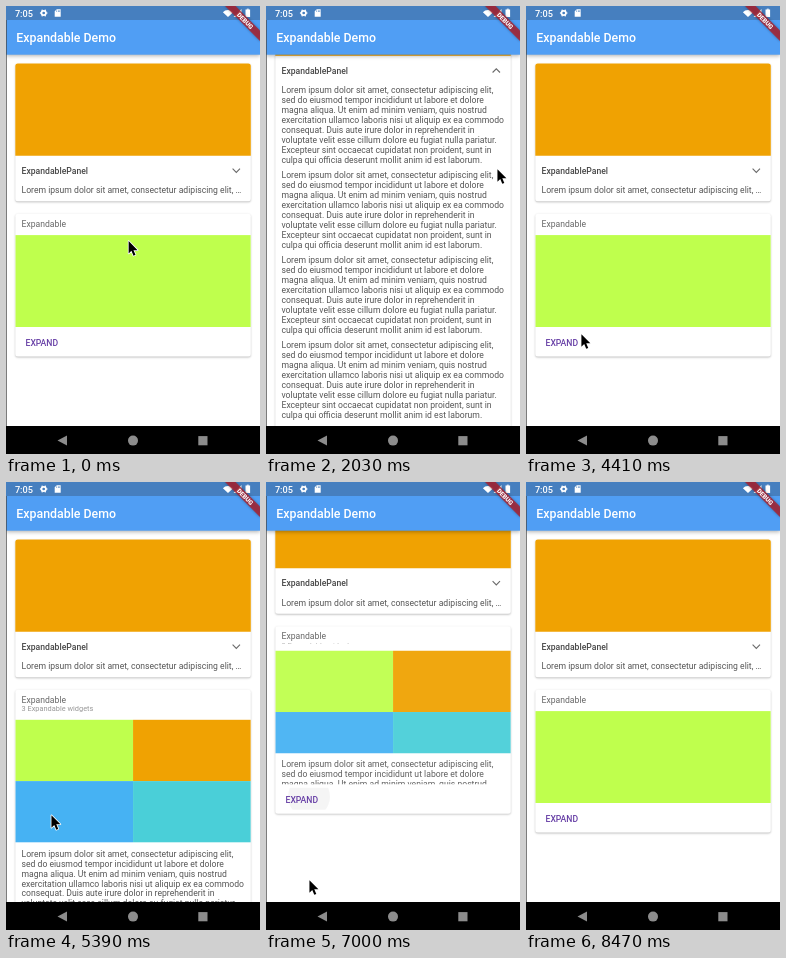
An HTML page with a canvas that plays this animation: 254x448 px, repeating every 8540 ms.

```html
<!DOCTYPE html>
<html lang="en">
<head>
<meta charset="utf-8">
<title>Expandable Demo</title>
<style>
html, body { margin: 0; width: 100%; height: 100%; overflow: hidden; background: #fff; }
canvas { display: block; width: 254px; height: 448px; }
</style>
</head>
<body>
<canvas id="stage"></canvas>
<script>
const W = 254, H = 448, LOOP = 8540;
const LEFT = 9.3, RIGHT = 244.8, WIDE = RIGHT - LEFT, HALF = WIDE / 2;
const TEXT_X = 15.5;
const ORANGE = '#f0a202', LIME = '#bfff4d', BLUE = '#46b2f3', TEAL = '#4acfd8';
const INK = '#565656', DARK = '#484848', PURPLE = '#673fa6';
const LOREM = [
  'Lorem ipsum dolor sit amet, consectetur adipiscing elit,',
  'sed do eiusmod tempor incididunt ut labore et dolore',
  'magna aliqua. Ut enim ad minim veniam, quis nostrud',
  'exercitation ullamco laboris nisi ut aliquip ex ea commodo',
  'consequat. Duis aute irure dolor in reprehenderit in',
  'voluptate velit esse cillum dolore eu fugiat nulla pariatur.',
  'Excepteur sint occaecat cupidatat non proident, sunt in',
  'culpa qui officia deserunt mollit anim id est laborum.'
];
// Pointer keys: time, x, y
const POINTER = [
  [0, 122, 234], [540, 231, 162], [2150, 231, 162], [2800, 232, 60],
  [3880, 232, 60], [4410, 55, 327], [4620, 45, 332], [5740, 45, 332],
  [6090, 45, 364], [6420, 43, 397], [8150, 43, 397], [8450, 95, 450], [LOOP, 95, 450]
];

const canvas = document.getElementById('stage');
const ctx = canvas.getContext('2d');
const ratio = window.devicePixelRatio || 1;
canvas.width = W * ratio;
canvas.height = H * ratio;

const clamp = x => Math.min(1, Math.max(0, x));
const mix = (a, b, k) => a + (b - a) * k;
const span = (t, start, length) => clamp((t - start) / length);
const smooth = k => k * k * (3 - 2 * k);

// cubic-bezier(.4, 0, .2, 1)
function fastOutSlowIn(x) {
  let lo = 0, hi = 1, s = 0.5;
  for (let i = 0; i < 20; i++) {
    s = (lo + hi) / 2;
    const bx = 1.2 * s * (1 - s) ** 2 + 0.6 * s * s * (1 - s) + s ** 3;
    if (bx < x) lo = s; else hi = s;
  }
  return s * s * (3 - 2 * s);
}

// Overdamped spring, from 1 at rest to 0
function spring(ms) {
  const s = Math.max(0, ms) / 1000;
  return 1.7 * Math.exp(-9.1 * s) - 0.7 * Math.exp(-22 * s);
}

function toggle(t, open, close) {
  const up = span(t, open, 500), down = span(t, close, 500);
  const linear = up - down;
  return {
    size: fastOutSlowIn(up) - fastOutSlowIn(down),
    turn: linear,
    closedAlpha: 1 - clamp(linear / 0.45),
    openAlpha: clamp((linear - 0.2) / 0.4)
  };
}

function scrollAt(t) {
  const first = 100 * smooth(span(t, 1740, 290)) * spring(t - 3420);
  const second = 63.5 * smooth(span(t, 5450, 270)) * spring(t - 7005);
  return t < 5000 ? first : second;
}

function pointerAt(t) {
  const i = POINTER.findIndex(key => key[0] > t);
  const [t0, x0, y0] = POINTER[i - 1], [t1, x1, y1] = POINTER[i];
  const k = (t - t0) / (t1 - t0);
  return [mix(x0, x1, k), mix(y0, y1, k)];
}

function rect(x, y, w, h, color) {
  ctx.fillStyle = color;
  ctx.fillRect(x, y, w, h);
}

function poly(points, color) {
  ctx.beginPath();
  points.forEach(([x, y]) => ctx.lineTo(x, y));
  ctx.closePath();
  ctx.fillStyle = color;
  ctx.fill();
}

function disc(x, y, r, color) {
  ctx.beginPath();
  ctx.arc(x, y, r, 0, 2 * Math.PI);
  ctx.fillStyle = color;
  ctx.fill();
}

function text(string, x, y, { size = 8.65, weight = 400, color = INK } = {}) {
  ctx.font = `${weight} ${size}px Roboto, sans-serif`;
  ctx.fillStyle = color;
  ctx.fillText(string, x, y);
}

function saved(draw) {
  ctx.save();
  draw();
  ctx.restore();
}

function clipped(x, y, w, h, alpha, draw) {
  if (alpha <= 0 || h <= 0) return;
  saved(() => {
    ctx.beginPath();
    ctx.rect(x, y, w, h);
    ctx.clip();
    ctx.globalAlpha = alpha;
    draw();
  });
}

function card(top, bottom) {
  saved(() => {
    ctx.shadowColor = 'rgba(0,0,0,.25)';
    ctx.shadowBlur = 2 * ratio;
    ctx.shadowOffsetY = 0.9 * ratio;
    ctx.beginPath();
    ctx.roundRect(LEFT, top, WIDE, bottom - top, 2.5);
    ctx.fillStyle = '#fff';
    ctx.fill();
  });
}

function paragraph(y) {
  LOREM.forEach((line, i) => text(line, TEXT_X, y + i * 9.9));
}

function ripple(t, start, x, y, x0, y0, w, h) {
  const age = t - start;
  if (age < 0 || age > 500) return;
  const alpha = 0.055 * (1 - span(age, 220, 280));
  clipped(x0, y0, w, h, 1, () => disc(x, y, 6 + 15 * span(age, 0, 300), `rgba(0,0,0,${alpha})`));
}

function panelCard(t, state) {
  const grow = 414 * state.size;
  card(57.3, 195.3 + grow);
  saved(() => {
    ctx.beginPath();
    ctx.roundRect(LEFT, 57.4, WIDE, 92.3, [2.5, 2.5, 0, 0]);
    ctx.fillStyle = ORANGE;
    ctx.fill();
  });
  [1120, 3080].forEach(start => ripple(t, start, 231.5, 165, LEFT, 150, WIDE, 36));
  text('ExpandablePanel', TEXT_X, 167.8, { weight: 500, color: DARK });
  saved(() => {
    ctx.translate(230.3, 164.6);
    ctx.rotate(Math.PI * state.turn);
    ctx.beginPath();
    ctx.moveTo(-3.7, -1.9);
    ctx.lineTo(0, 1.8);
    ctx.lineTo(3.7, -1.9);
    ctx.strokeStyle = '#6a6a6a';
    ctx.lineWidth = 1.1;
    ctx.stroke();
  });
  const height = 11 + grow;
  clipped(LEFT, 178.5, WIDE, height, state.closedAlpha, () => text(LOREM[0] + ' …', TEXT_X, 187.4));
  clipped(LEFT, 178.5, WIDE, height, state.openAlpha, () => {
    for (let i = 0; i < 5; i++) paragraph(187.4 + i * 85);
  });
}

function galleryCard(t, state, top) {
  const p = state.size;
  saved(() => {
    ctx.translate(0, top);
    const imageTop = 21.4 + 8.5 * p, imageHeight = mix(92, 123, p);
    const bodyTop = imageTop + imageHeight, bodyHeight = 90 * p;
    const bottom = bodyTop + bodyHeight + 29.5;
    card(0, bottom);
    text('Expandable', TEXT_X, 13.2, { color: '#686868' });
    clipped(LEFT, 14, WIDE, 10 * p, state.openAlpha, () =>
      text('3 Expandable widgets', TEXT_X, 21.4, { size: 7.4, color: '#989898' }));
    clipped(LEFT, imageTop, WIDE, imageHeight, state.closedAlpha, () =>
      rect(LEFT, imageTop, WIDE, 92, LIME));
    clipped(LEFT, imageTop, WIDE, imageHeight, state.openAlpha, () => {
      rect(LEFT, imageTop, HALF, 61.5, LIME);
      rect(LEFT + HALF, imageTop, HALF, 61.5, ORANGE);
      rect(LEFT, imageTop + 61.5, HALF, 61.5, BLUE);
      rect(LEFT + HALF, imageTop + 61.5, HALF, 61.5, TEAL);
    });
    clipped(LEFT, bodyTop, WIDE, bodyHeight, state.openAlpha, () => paragraph(bodyTop + 14.2));
    ripple(t, 4740, 45, bottom - 17, 14, bottom - 26, 45, 22);
    ripple(t, 6700, 43, bottom - 17, 14, bottom - 26, 53, 22);
    text(p > 0.5 ? 'COLLAPSE' : 'EXPAND', 19.5, bottom - 11, { weight: 500, color: PURPLE });
  });
}

function statusIcons() {
  // Gear
  ctx.strokeStyle = '#fff';
  ctx.lineWidth = 1.7;
  ctx.beginPath();
  ctx.arc(37.7, 7, 2.2, 0, 2 * Math.PI);
  ctx.stroke();
  for (let i = 0; i < 6; i++) {
    const a = i * Math.PI / 3;
    disc(37.7 + 3.1 * Math.cos(a), 7 + 3.1 * Math.sin(a), 0.8, '#fff');
  }
  // Memory card
  poly([[50.8, 3.2], [54.7, 3.2], [54.7, 10.8], [48.7, 10.8], [48.7, 5.3]], '#fff');
  [50.5, 52, 53.5].forEach(x => rect(x, 4.3, 0.6, 1.7, '#467fbf'));
  // Wi-Fi, signal, battery
  ctx.beginPath();
  ctx.moveTo(222, 11);
  ctx.arc(222, 11, 7, -Math.PI * 0.76, -Math.PI * 0.24);
  ctx.fillStyle = '#fff';
  ctx.fill();
  poly([[235.5, 3], [235.5, 11], [227.5, 11]], '#fff');
  rect(239.5, 3.5, 4.6, 7.5, '#fff');
  rect(240.8, 2.7, 2, 1, '#fff');
}

function chrome() {
  saved(() => {
    ctx.shadowColor = 'rgba(0,0,0,.3)';
    ctx.shadowBlur = 4 * ratio;
    ctx.shadowOffsetY = 1 * ratio;
    rect(0, 0, W, 48.7, '#509ef4');
  });
  rect(0, 0, W, 14, '#467fbf');
  text('7:05', 8.9, 10.8, { size: 9.2, weight: 500, color: '#fff' });
  statusIcons();
  text('Expandable Demo', 10.3, 36.4, { size: 12.36, weight: 500, color: '#fff' });

  saved(() => {
    ctx.translate(W, 0);
    ctx.rotate(Math.PI / 4);
    saved(() => {
      ctx.shadowColor = 'rgba(0,0,0,.4)';
      ctx.shadowBlur = 3 * ratio;
      rect(-24.7, 17.3, 49.4, 7.4, 'rgba(172,32,46,.82)');
    });
    ctx.textAlign = 'center';
    text('DEBUG', 0, 23.3, { size: 6.3, weight: 900, color: '#fff' });
  });

  rect(0, 420, W, 28, '#000');
  poly([[51.5, 434.6], [61, 429.6], [61, 439.6]], '#8c8c8c');
  disc(127, 434.6, 5, '#8c8c8c');
  rect(192.3, 430.1, 9.2, 9.2, '#8c8c8c');
  rect(0, 14, 0.7, 406, '#444');
}

function pointer(x, y) {
  saved(() => {
    ctx.translate(x, y + 0.8);
    ctx.scale(0.88, 0.88);
    ctx.lineJoin = 'round';
    ctx.strokeStyle = '#fff';
    ctx.lineWidth = 1.8;
    poly([[0.5, 0.5], [0.5, 14.6], [3.7, 11.6], [6, 17], [8.3, 16], [6, 10.8], [10.7, 10.8]], '#000');
    ctx.stroke();
    ctx.fill();
  });
}

function draw(t) {
  const panel = toggle(t, 1190, 3186);
  const gallery = toggle(t, 4830, 6790);
  ctx.setTransform(ratio, 0, 0, ratio, 0, 0);
  rect(0, 0, W, H, '#fff');
  saved(() => {
    ctx.translate(0, -scrollAt(t));
    panelCard(t, panel);
    galleryCard(t, gallery, 207.7 + 414 * panel.size);
  });
  chrome();
  pointer(...pointerAt(t));
}

function frame() {
  draw(performance.now() % LOOP);
  requestAnimationFrame(frame);
}
frame();
</script>
</body>
</html>
```
